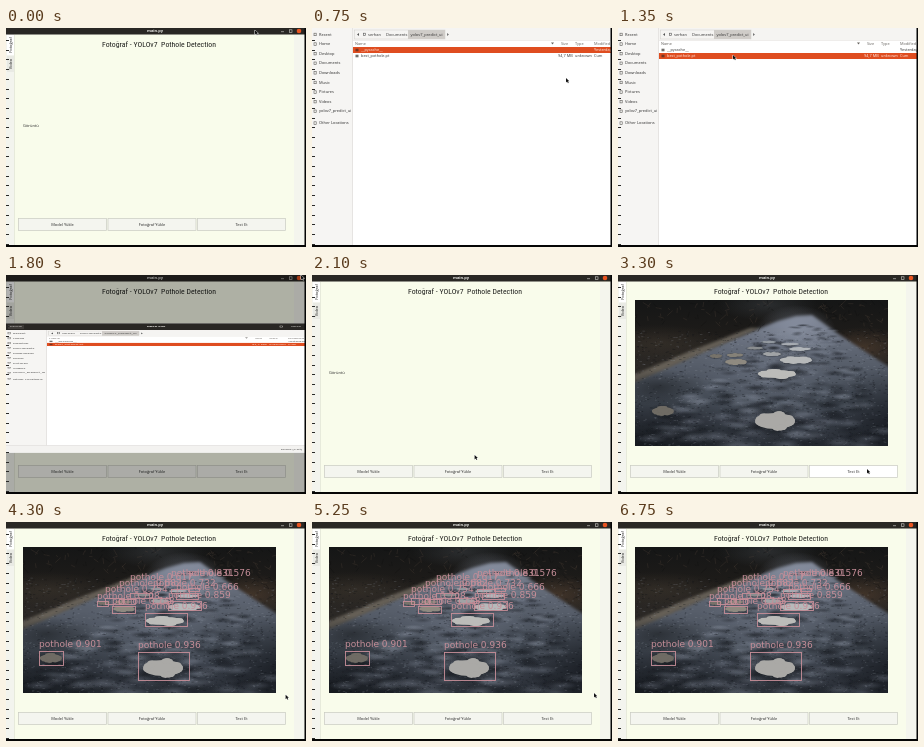
These frames come from a looping animation (300 by 219 pixels, 6.8 s). An HTML page with a canvas:

```html
<!DOCTYPE html>
<html lang="tr">
<head>
<meta charset="utf-8">
<title>Pothole Detection</title>
<style>
html, body { margin: 0; width: 100%; height: 100%; overflow: hidden; background: #000; }
canvas { display: block; width: 300px; height: 219px; }
</style>
</head>
<body>
<canvas id="stage" width="300" height="219"></canvas>
<script>
const LOOP = 6800, W = 300, H = 219;
const UI = '"Open Sans", "Noto Sans", sans-serif';
const stage = document.getElementById('stage').getContext('2d');
let g = stage;

function rect(x, y, w, h, color) {
  g.fillStyle = color;
  g.fillRect(x, y, w, h);
}
function frame(x, y, w, h, color, line = 1) {
  g.strokeStyle = color;
  g.lineWidth = line;
  g.strokeRect(x, y, w, h);
}
function text(s, x, y, color = '#292929', size = 4, align = 'left', weight = 400) {
  g.font = `${weight} ${size}px ${UI}`;
  g.textAlign = align;
  g.textBaseline = 'middle';
  g.fillStyle = color;
  g.fillText(s, x, y);
}
function poly(color, ...p) {
  g.fillStyle = color;
  g.beginPath();
  for (let i = 0; i < p.length; i += 2) g.lineTo(p[i], p[i + 1]);
  g.closePath();
  g.fill();
}
function oval(x, y, rx, ry, color) {
  g.fillStyle = color;
  g.beginPath();
  g.ellipse(x, y, rx, ry, 0, 0, Math.PI * 2);
  g.fill();
}
function shade(x0, y0, x1, y1, ...colors) {
  const s = g.createLinearGradient(x0, y0, x1, y1);
  colors.forEach((c, i) => s.addColorStop(i / (colors.length - 1), c));
  return s;
}
// Soft elliptical patch that fades from an rgb triple to nothing
function glow(x, y, rx, ry, rgb, alpha) {
  g.save();
  g.translate(x, y);
  g.scale(rx, ry);
  const s = g.createRadialGradient(0, 0, 0, 0, 0, 1);
  s.addColorStop(0, `rgba(${rgb},${alpha})`);
  s.addColorStop(1, `rgba(${rgb},0)`);
  rect(-1, -1, 2, 2, s);
  g.restore();
}
function random(seed) {
  return () => (seed = (seed * 16807) % 2147483647) / 2147483647;
}

// Road scene, painted once
const photo = document.createElement('canvas');
photo.width = W;
photo.height = H;

function paintPhoto() {
  const rnd = random(71);
  g = photo.getContext('2d');
  g.beginPath();
  g.rect(17, 25, 253, 146);
  g.clip();
  rect(17, 25, 253, 146, shade(0, 25, 0, 90, '#151616', '#1d1b19', '#2b2825'));
  glow(150, 30, 50, 16, '62,66,70', 0.5);
  glow(245, 72, 45, 20, '84,64,48', 0.6);
  glow(40, 68, 70, 18, '66,58,48', 0.5);

  g.filter = 'blur(1.5px)';
  poly(shade(0, 42, 0, 175, '#7d8494', '#5e6572', '#4c535e', '#3c424c', '#2a2f37'),
    160, 46, 178, 41, 194, 40, 222, 60, 274, 94, 274, 175, 13, 175, 13, 106, 90, 74);
  poly('#666057', 13, 101, 70, 77, 132, 53, 142, 53, 82, 79, 13, 109);
  g.filter = 'none';

  glow(178, 56, 40, 26, '150,158,175', 0.55);
  glow(150, 98, 70, 46, '125,133,150', 0.4);
  glow(22, 172, 115, 60, '16,19,23', 0.8);
  glow(275, 150, 75, 60, '16,19,24', 0.75);
  glow(40, 112, 50, 18, '24,27,30', 0.6);

  // Wet patches and grain grow towards the viewer
  for (let i = 0; i < 300; i++) {
    const y = 50 + rnd() * 121, near = (y - 35) / 135;
    const x = 180 - 175 * near + rnd() * (30 + 240 * near);
    glow(x, y, 4 + 13 * near, 1 + 4 * near, rnd() < 0.6 ? '18,21,26' : '135,143,158', 0.35);
  }
  for (let i = 0; i < 1800; i++) {
    const y = 55 + rnd() * 116, x = 17 + rnd() * 253;
    rect(x, y, 0.6 + rnd() * 2, 0.7, rnd() < 0.55 ? '#0d111566' : '#9aa2ae40');
  }
  // Twigs on both banks
  g.lineWidth = 0.6;
  for (let i = 0; i < 130; i++) {
    const side = rnd() < 0.5;
    const x = side ? 17 + rnd() * 140 : 200 + rnd() * 70;
    const y = side ? 26 + rnd() * 26 : 28 + rnd() * (x - 190) * 0.6;
    g.strokeStyle = rnd() < 0.6 ? '#0e0e0e99' : '#6a5a4855';
    g.beginPath();
    g.moveTo(x, y);
    g.lineTo(x + rnd() * 12 - 6, y + rnd() * 12 - 6);
    g.stroke();
  }

  const holes = [
    [157, 146, 20, 10, '#aaa9a6'], [159, 99, 19, 5, '#bcbcb9'],
    [178, 85, 16, 4, '#b7b9ba'], [118, 87, 11, 3, '#8f8a80'],
    [45, 136, 11, 5, '#6f6b64'], [117, 80, 8, 2, '#858178'],
    [98, 81, 6, 2, '#77736b'], [182, 74, 11, 1.8, '#b2b6ba'],
    [154, 79, 9, 2, '#a1a4a6'], [137, 73, 8, 1.5, '#8b8e90'],
    [172, 69, 9, 1.3, '#a9aeb4'], [151, 67, 7, 1.2, '#949aa0']
  ];
  for (const [x, y, rx, ry, color] of holes) {
    glow(x, y + 0.5, rx * 1.35, ry * 1.6, '20,23,26', 0.7);
    oval(x, y, rx, ry * 0.8, color);
    for (let i = 0; i < 14; i++) {
      const a = rnd() * Math.PI * 2;
      oval(x + Math.cos(a) * rx * 0.74, y + Math.sin(a) * ry * 0.72, rx * 0.26, ry * 0.28, color);
    }
  }
  g = stage;
}

// Label x, label baseline, score, then the box: top, width, height
const hits = [
  [33, 125, '0.901', 129, 24, 14], [132, 126, '0.936', 130, 51, 28],
  [139, 87, '0.936', 91, 42, 13], [106, 82, '0.743', 84, 23, 7],
  [162, 76, '0.859', 79, 33, 9], [170, 68, '0.666', 71, 22, 6],
  [165, 54, '0.831', 67, 18, 4], [182, 54, '0.576', 66, 11, 3],
  [124, 58, '0.617', 71, 22, 5], [113, 64, '0.682', 77, 16, 5],
  [99, 70, '0.754', 76, 18, 6], [91, 77, '0.708', 79, 11, 5],
  [147, 64, '0.732', 76, 17, 5]
];

function detections() {
  const pink = '#c68e98';
  g.textAlign = 'left';
  g.textBaseline = 'alphabetic';
  for (const [x, y, score, top, w, h] of hits) {
    frame(x + 0.5, top + 0.5, w, h, pink, 0.9);
    g.font = '9px "DejaVu Sans", sans-serif';
    g.fillStyle = pink;
    g.fillText('pothole ' + score, x, y);
  }
}

function title() {
  const s = 'Fotoğraf - YOLOv7  Pothole Detection';
  const font = px => `${px}px "Roboto Condensed", Roboto, sans-serif`;
  g.save();
  g.fontStretch = 'condensed';
  g.font = font(10);
  g.font = font(Math.min(10, 1140 / g.measureText(s).width));
  g.textAlign = 'center';
  g.textBaseline = 'middle';
  g.fillStyle = '#20211e';
  g.fillText(s, 153, 16.5);
  g.restore();
}

function sideTab(s, y, h, color) {
  rect(1, y, 7, h, color);
  g.save();
  g.translate(4.5, y + h / 2);
  g.rotate(-Math.PI / 2);
  text(s, 0, 0, '#222', 4, 'center');
  g.restore();
}

function mainWindow(t, cursor) {
  rect(0, 0, W, H, '#f9fceb');
  rect(0, 6, 8, 212, '#f3f4ee');
  rect(8, 7, 0.5, 210, '#d5d8ca');
  rect(288, 7, 11, 210, '#f4f5ed');
  sideTab('Fotoğraf', 7, 20, '#ffffff');
  sideTab('Video', 28, 16, '#e9eae4');
  title();

  if (t < 3230) text('Görüntü', 17, 98);
  else g.drawImage(photo, 0, 0);
  if (t >= 3950) detections();

  ['Model Yükle', 'Fotoğraf Yükle', 'Test Et'].forEach((s, i) => {
    const x = 12 + i * 89.5;
    const over = cursor[1] > 190 && cursor[1] < 203 && cursor[0] > x && cursor[0] < x + 89;
    rect(x, 190.5, 88.5, 12, over ? '#ffffff' : '#f4f5ef');
    frame(x + 0.5, 190.5, 88, 12, '#c9cbc2', 0.7);
    text(s, x + 44.5, 196.7, '#292929', 4, 'center');
  });

  rect(0, 0, W, 6.5, '#292724');
  text('main.py', 149, 3, '#eeeeea', 4, 'center', 700);
  rect(275, 3.5, 3, 0.6, '#d0cec8');
  frame(283.5, 1.8, 2.5, 2.5, '#d0cec8', 0.6);
  oval(293, 3, 2.3, 2.3, '#e95420');
}

const places = ['Recent', 'Home', 'Desktop', 'Documents', 'Downloads', 'Music',
  'Pictures', 'Videos', 'yolov7_predict_ui', 'Other Locations'];

function row(y, cells, selected) {
  if (selected) rect(41, y - 3, 258, 6, '#df4d20');
  const color = selected ? '#fff0e8' : '#333333';
  rect(43.5, y - 1.3, 3, 2.6, selected ? '#713522' : '#72706d');
  [49, 246, 263, 282].forEach((x, i) => text(cells[i], x, y, color, 3.9));
}

function dialog(d) {
  const mid = 113.5;
  rect(0, 0, W, H, `rgba(0,0,0,${0.3 * Math.min(1, d.open * 2)})`);
  g.save();
  g.translate(0, mid);
  g.scale(1, d.open);
  g.translate(0, -mid);
  rect(0, -13, W, 251, '#ffffff');
  rect(0, -13, W, 13, '#292724');
  rect(2, -10, 16, 8, '#3d3a37');
  text('Cancel', 10, -6, '#e4e2de', 4, 'center');
  text('Open File', 150, -6, '#f3f1ed', 4, 'center', 700);
  frame(274, -8, 2.5, 3, '#d0cec8', 0.6);
  text('Open', 285, -6, '#e4e2de', 4);

  rect(0, 0, 40.5, 224, '#f6f5f3');
  rect(40.5, 0, 0.5, 224, '#d2cfcb');
  places.forEach((s, i) => {
    const y = 6.5 + i * 9.6 + (i === 9 ? 2.2 : 0);
    frame(2, y - 1.3, 2.2, 2.5, '#5c5a57', 0.6);
    text(s, 7, y, '#2d2d2d', 4);
  });

  rect(41, 0, 258, 12, '#f5f4f2');
  rect(96, 2, 37, 9, '#cfccc8');
  frame(42.5, 2, 90.5, 9, '#d0cdc9', 0.5);
  poly('#555', 47, 5, 45, 6.5, 47, 8);
  frame(51.5, 5.2, 2, 2.3, '#555', 0.6);
  text('serhan', 56, 6.5, '#333', 4);
  text('Documents', 74, 6.5, '#333', 4);
  text('yolov7_predict_ui', 114.5, 6.5, '#333', 4, 'center');
  poly('#777', 135, 5, 137, 6.5, 135, 8);

  rect(41, 12, 258, 0.5, '#dedbd7');
  text('Name', 43, 15.5, '#66635f', 3.9);
  poly('#66635f', 239, 14.5, 242, 14.5, 240.5, 16.5);
  ['Size', 'Type', 'Modified'].forEach((s, i) =>
    text(s, [249, 263, 282][i], 15.5, '#66635f', 3.9));
  row(22, ['__pycache__', '', '', 'Yesterday'], d.pick === 0);
  row(28, d.file, d.pick === 1);

  rect(0, 224, W, 14, '#f3f2f0');
  rect(0, 224, W, 0.7, '#cbc8c4');
  text(d.filter, 296, 231, '#333', 4, 'right');
  g.restore();
}

const clamp = v => Math.max(0, Math.min(1, v));
const ease = v => v * v * (3 - 2 * v);

const dialogs = [
  { from: 480, to: 1903, pickAt: 1250, filter: 'Pickle (*.pt)',
    file: ['best_pothole.pt', '94,7 MB', 'unknown', 'Cum'] },
  { from: 2330, to: 3200, pickAt: 2600, filter: 'Image (*.png)',
    file: ['pothole.png', '340,3 kB', 'Image', 'Cum'] }
];

// Time, x, y
const path = [
  [0, 249, 2], [380, 60, 197], [500, 60, 197], [750, 254, 50], [1150, 115, 27],
  [1350, 115, 27], [1650, 295, 0], [1880, 295, 0], [2150, 150, 197],
  [2350, 150, 197], [2580, 105, 27], [2650, 105, 27], [2800, 295, 0],
  [3080, 295, 0], [3280, 249, 194], [3800, 249, 194], [4400, 282, 171],
  [5350, 282, 171], [5700, 304, 171], [LOOP, 304, 171]
];

function cursorAt(t) {
  const i = path.findIndex(p => p[0] > t);
  const [t0, x0, y0] = path[i - 1], [t1, x1, y1] = path[i];
  const k = ease((t - t0) / (t1 - t0));
  return [x0 + (x1 - x0) * k, y0 + (y1 - y0) * k];
}

function pointer([x, y]) {
  g.save();
  g.translate(x, y);
  g.beginPath();
  [[0, 0], [0, 4.5], [1.1, 3.5], [2, 5.2], [2.7, 4.8], [1.9, 3.2], [3.3, 3.2]]
    .forEach(p => g.lineTo(...p));
  g.closePath();
  g.lineWidth = 0.9;
  g.strokeStyle = '#ffffff';
  g.stroke();
  g.fillStyle = '#111111';
  g.fill();
  g.restore();
}

function draw(t) {
  const cursor = cursorAt(t);
  mainWindow(t, cursor);
  for (const d of dialogs) {
    if (t < d.from || t >= d.to) continue;
    const open = Math.min(ease(clamp((t - d.from) / 170)), ease(clamp((d.to - t) / 200)));
    dialog({ ...d, open, pick: t >= d.pickAt ? 1 : 0 });
  }
  for (let y = 12; y < 217; y += 9.7) rect(0, Math.round(y), 3, 1, '#2a2a28');
  rect(0, 217, W, 2, '#050505');
  rect(298.5, 0, 1.5, H, '#050505');
  pointer(cursor);
}

paintPhoto();
const start = performance.now();
function tick() {
  draw((performance.now() - start) % LOOP);
  requestAnimationFrame(tick);
}
tick();
</script>
</body>
</html>
```
